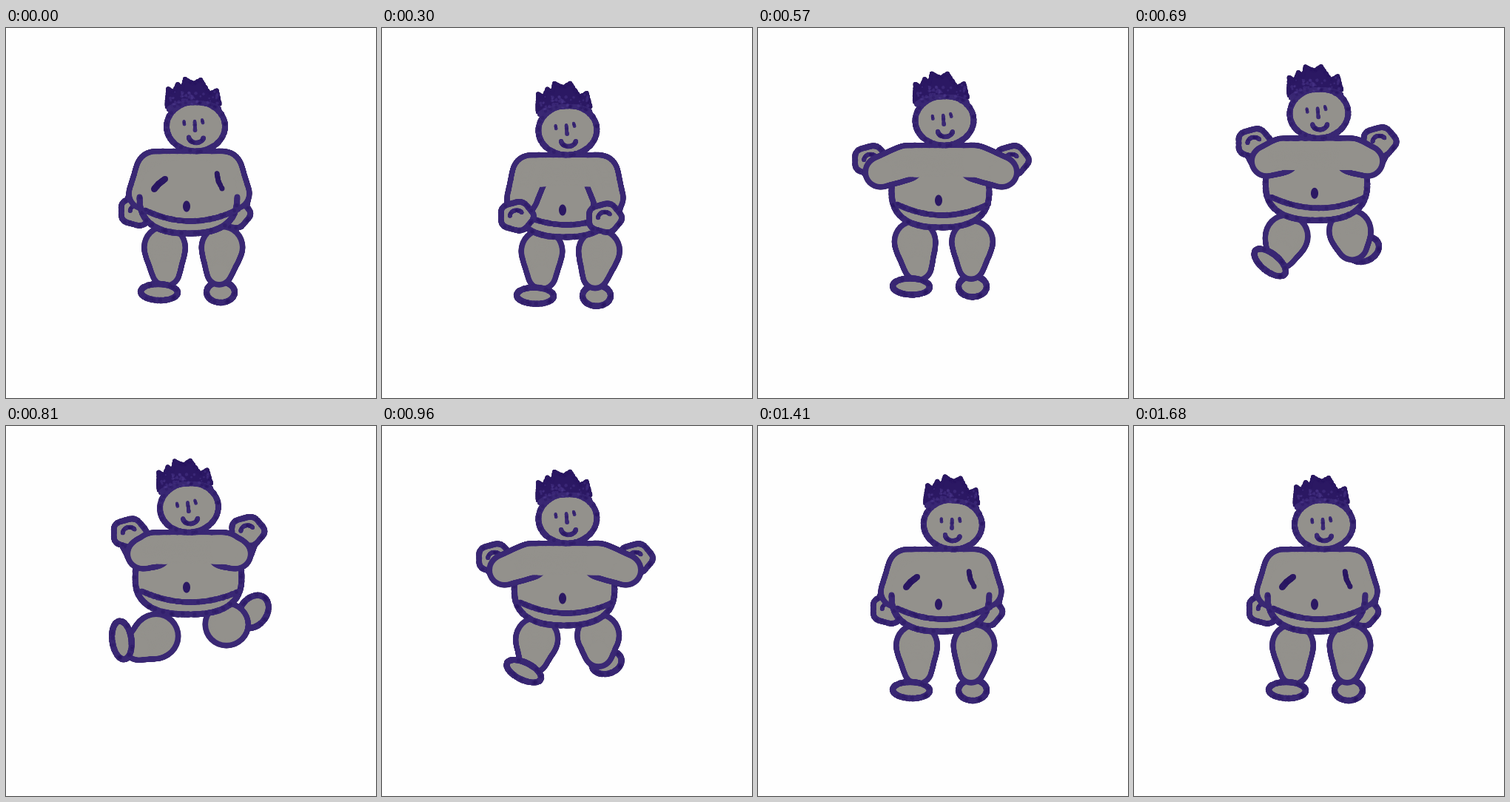
An HTML page with a canvas that plays this animation: 500x500 px, repeating every 8080 ms.

```html
<!DOCTYPE html>
<html lang="en">
<head>
<meta charset="utf-8">
<title>Jumping doodle</title>
<style>
html, body { margin: 0; width: 100%; height: 100%; overflow: hidden; background: #fefefe; }
canvas { display: block; width: 500px; height: 500px; filter: drop-shadow(0 0 .7px #777); }
</style>
</head>
<body>
<canvas id="stage" width="500" height="500"></canvas>
<script>
const g = document.getElementById('stage').getContext('2d');
const INK = '#3a2874', DARK = '#2b1863', SKIN = '#93918c', SHADE = 'rgba(32,14,88,.3)';
const LOOP = 8080, MOVE = 1680, STEP = 30;
const MID = 247.5, LINE = 7.6;

// time, body height, arm lift in degrees, head turn, leg tuck
const keys = [
  [0,     0,  22,  0,   0],
  [300,   5,  17, -.05, 0],
  [420,  14,  22, -.05, 0],
  [570,  -8,  94, -.04, 0],
  [825, -23, 124, -.08, 1],
  [960,  -8,  94, -.05, .3],
  [1070, 11,  22, -.03, 0],
  [1140,  8,  22, -.02, 0],
  [1410,  0,  22,  .06, 0],
  [1680,  0,  22,  0,   0]
];

// hip x, y, radius; ankle x, y, radius; foot x, y, radii, turn
const legs = [
  { down: [214.5, 296, 28, 216, 330, 18, 207, 357, 25, 11, .03],
    bent: [203, 284, 30, 178, 298, 18, 156, 289, 26, 13, 1.45] },
  { down: [292, 296, 28, 288, 331, 16, 290, 357, 19, 14, 0],
    bent: [298, 268, 29, 303, 268, 24, 335, 250, 24, 18, -.95] }
];

const sides = [{ dir: -1, gain: 1, lag: 0 }, { dir: 1, gain: 1.15, lag: 14 }];

const mix = (a, b, u) => a + (b - a) * u;
const ease = u => (u = Math.min(1, Math.max(0, u)), u * u * (3 - 2 * u));

// Monotone cubic interpolation through one column of the keys
function track(col, t) {
  let k = 0;
  while (k < keys.length - 2 && t >= keys[k + 1][0]) k++;
  const slope = i => (keys[i + 1][col] - keys[i][col]) / (keys[i + 1][0] - keys[i][0]);
  const tangent = i => {
    if (i === 0 || i === keys.length - 1) return 0;
    const a = slope(i - 1), b = slope(i);
    return a * b <= 0 ? 0 : 2 * a * b / (a + b);
  };
  const h = keys[k + 1][0] - keys[k][0], u = (t - keys[k][0]) / h, v = 1 - u;
  return keys[k][col] * v * v * (1 + 2 * u) + keys[k + 1][col] * u * u * (3 - 2 * u)
    + h * u * v * (tangent(k) * v - tangent(k + 1) * u);
}

function seeded(n) {
  return () => (n = (n * 16807) % 2147483647) / 2147483647;
}

function dot(x, y, r, color) {
  g.fillStyle = color;
  g.beginPath();
  g.arc(x, y, r, 0, Math.PI * 2);
  g.fill();
}

// Rough marker line through points
function brush(pts, width = LINE, color = INK) {
  const rand = seeded(pts.length * 97 + 5);
  const dabs = [];
  for (let i = 1; i < pts.length; i++) {
    const [ax, ay] = pts[i - 1], [bx, by] = pts[i];
    const n = Math.ceil(Math.hypot(bx - ax, by - ay));
    for (let j = 0; j <= n; j++) dabs.push([mix(ax, bx, j / n), mix(ay, by, j / n)]);
  }
  for (const [x, y] of dabs) dot(x, y, width / 2 - .3 + rand() * .8, color);
  for (const [x, y] of dabs)
    if (rand() < .08) dot(x + rand() * 2 - 1, y + rand() * 2 - 1, width * .35, SHADE);
}

function fill(pts, color = SKIN) {
  g.fillStyle = color;
  g.beginPath();
  pts.forEach(p => g.lineTo(...p));
  g.fill();
}

function blob(pts, width) {
  fill(pts);
  brush(pts, width);
}

// Ellipse points; a higher power squares it off, knuckles make it lumpy
function ring(x, y, rx, ry, { turn = 0, power = 2, knuckles = 0, from = 0, to = 2 } = {}) {
  const n = 48, bend = v => Math.sign(v) * Math.abs(v) ** (2 / power);
  return Array.from({ length: n + 1 }, (_, i) => {
    const a = Math.PI * mix(from, to, i / n), k = 1 + knuckles * Math.cos(5 * a);
    const px = rx * k * bend(Math.cos(a)), py = ry * k * bend(Math.sin(a));
    return [x + px * Math.cos(turn) - py * Math.sin(turn), y + px * Math.sin(turn) + py * Math.cos(turn)];
  });
}

// Limb made of overlapping circles
function tube(a, b, ra, rb, grow, color) {
  const n = Math.ceil(Math.hypot(b[0] - a[0], b[1] - a[1])) + 1, rand = seeded(n + 11);
  for (let i = 0; i <= n; i++) {
    const u = i / n;
    dot(mix(a[0], b[0], u), mix(a[1], b[1], u), mix(ra, rb, u) + grow + (rand() - .5) * .8, color);
  }
}
const limbInk = (a, b, ra, rb) => tube(a, b, ra, rb, LINE / 2, INK);
const limbSkin = (a, b, ra, rb) => tube(a, b, ra, rb, -LINE / 2, SKIN);
function limb(...shape) {
  limbInk(...shape);
  limbSkin(...shape);
}

function armJoints({ dir, gain, lag }, lift, y) {
  const shoulder = [MID + dir * 47.5, 190 + y];
  const polar = (deg, len) => {
    const a = deg * Math.PI / 180;
    return [shoulder[0] + dir * len * Math.sin(a), shoulder[1] + len * Math.cos(a)];
  };
  const elbow = polar(Math.min(70, lift), 37 - 20 * ease((lift - 94) / 30));
  const hand = polar(lift * gain - lag, 62 - 22 * ease((lift - 50) / 74));
  return { shoulder, elbow, hand };
}

function drawForearm({ elbow, hand }) {
  limb(elbow, hand, 19, 16);
}

function drawHand({ hand: [x, y] }) {
  blob(ring(x, y, 22, 19, { knuckles: .05 }), 7);
  brush(ring(x, y, 9, 8, { from: 1, to: 1.8 }), 5);
}

function drawLegs(y, tuck) {
  const [left, right] = legs.map(({ down, bent }) => down.map((v, i) => {
    const isY = i === 1 || i === 4 || i === 7;
    const shift = isY ? y * .95 : i === 0 ? y * .3 : 0;
    return mix(v + shift, bent[i], tuck);
  }));
  const thigh = p => limb([p[0], p[1]], [p[3], p[4]], p[2], p[5]);
  const foot = p => blob(ring(p[6], p[7], p[8], p[9], { turn: p[10] }));
  thigh(left);
  foot(left);
  foot(right);
  thigh(right);
}

function drawBody(arms, y, tuck, behind) {
  const belly = ring(MID - 1, 228 + y, 66 * (1 + .09 * tuck), 49.5, { power: 2.5 });
  const chest = [arms[0].shoulder, arms[1].shoulder, 23, 23];
  const uppers = arms.map(a => [a.shoulder, a.elbow, 23, 20]);
  limbInk(...chest);
  blob(belly);
  limbSkin(...chest);
  uppers.forEach(u => limbInk(...u));
  uppers.forEach(u => limbSkin(...u));
  limbSkin(...chest);
  if (!behind) return;
  fill(belly);
  brush(belly.slice(0, 25));
}

function drawMarks(y, tuck, behind) {
  const wide = 62 * (1 + .07 * tuck);
  const belt = Array.from({ length: 25 }, (_, i) => {
    const u = i / 12 - 1;
    return [MID + 2 + u * wide, 261 + y - 15 * u * u];
  });
  brush(belt, 7);
  fill(ring(244, 241 + y, 5, 7.5), DARK);
  if (!behind) return;
  brush([[200, 218 + y], [206, 211 + y], [215, 204 + y]], 8, DARK);
  brush([[285, 196 + y], [287, 207 + y], [292, 217 + y]], 6, DARK);
}

function drawHair() {
  const tips = [[219, 82], [232, 76], [242, 69], [263, 70], [285, 84]];
  const edge = [[217, 107]];
  tips.forEach(([x, y], i) => {
    edge.push([x, y]);
    if (tips[i + 1]) edge.push([(x + tips[i + 1][0]) / 2 + 1, Math.max(y, tips[i + 1][1]) + 5]);
  });
  edge.push([289, 103]);
  const fringe = ring(254, 114, 36, 13, { from: 1.9, to: 1.1 });
  fill([...edge, ...fringe], DARK);
  brush(edge, 5, DARK);
  brush(fringe, 6, INK);
  const rand = seeded(42);
  for (let i = 0; i < 45; i++)
    dot(222 + rand() * 64, 86 + rand() * 17, 1 + rand() * 1.5, 'rgba(80,60,145,.4)');
}

function drawHead(y, turn) {
  g.save();
  g.translate(256 + turn * 80, 166 + y);
  g.rotate(turn);
  g.translate(-256, -166);
  blob(ring(256.5, 133, 39.5, 33.5), 7.2);
  drawHair();
  brush([[240.5, 126], [241, 130]], 4.5);
  brush([[265, 124], [266, 128]], 4.5);
  brush([[255, 126], [255.5, 138]], 5);
  brush(ring(257, 147, 10, 8, { from: .05, to: 1 }), 5.5);
  g.restore();
}

function draw(t) {
  const [y, lift, turn, tuck] = [1, 2, 3, 4].map(col => track(col, t));
  const arms = sides.map(s => armJoints(s, lift, y));
  const behind = t < 150 || t > 1020;
  const over = !behind && lift < 50;

  g.clearRect(0, 0, 500, 500);
  drawLegs(y, tuck);
  if (!over) arms.forEach(a => { drawForearm(a); drawHand(a); });
  drawBody(arms, y, tuck, behind);
  drawMarks(y, tuck, behind);
  if (over) arms.forEach(a => {
    drawForearm(a);
    limbSkin(a.shoulder, a.elbow, 23, 20);
    drawHand(a);
  });
  drawHead(y, turn);
}

const start = performance.now();
let shown = -1;
function tick() {
  const now = (performance.now() - start) % LOOP;
  const t = Math.min(MOVE, Math.floor(now / STEP) * STEP);
  if (t !== shown) draw(shown = t);
  requestAnimationFrame(tick);
}
tick();
</script>
</body>
</html>
```
